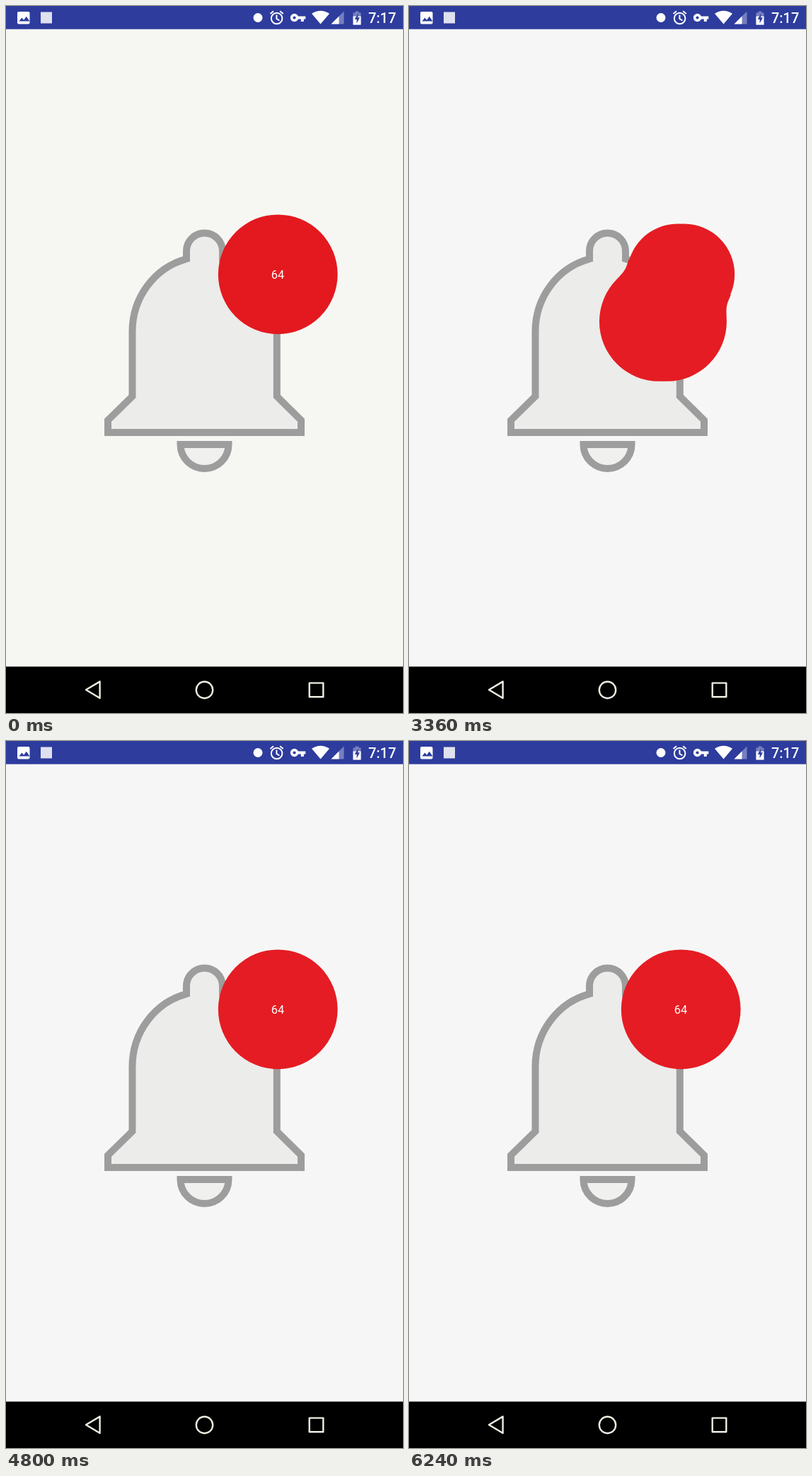
Animation of 561x998 px, one loop 6.28 s. Source, as an HTML page:

```html
<!DOCTYPE html>
<html lang="en">
<head>
<meta charset="utf-8">
<title>Notification badge</title>
<style>
  html, body { margin: 0; width: 100%; height: 100%; overflow: hidden; background: #000; }
  svg { display: block; width: 100%; height: 100%; }
  text { font-family: Roboto, sans-serif; fill: #fff; }
</style>
</head>
<body>
<svg viewBox="0 0 561 998">
  <rect id="page" width="561" height="934" fill="#f6f7f3"/>

  <g id="status">
    <rect width="561" height="32.7" fill="#2d3c9d"/>
    <rect x="16" y="8" width="17.5" height="17.5" rx="2" fill="#fff"/>
    <path d="M18.5 21.5l3.8-5 2.8 3.3 3.7-5 4.6 6.7z" fill="#2d3c9d"/>
    <rect x="49" y="8.5" width="16" height="16" fill="#dfe1ee"/>
    <circle cx="356" cy="16.5" r="6.5" fill="#fff"/>
    <g fill="none" stroke="#fff" stroke-width="2">
      <circle cx="382.6" cy="17.5" r="7.8"/>
      <path d="M382.4 12.5v5.5l4 2.5M373.5 11l4.5-3.8M391.7 11l-4.5-3.8"/>
      <circle cx="407.5" cy="16.5" r="3.9" stroke-width="3.6"/>
      <path d="M412 16.5h11.3M418.8 16.5v5.5" stroke-width="4"/>
    </g>
    <path d="M444.5 25.5L432 10.8Q444.5 2.5 457 10.8z" fill="#fff"/>
    <path d="M477.5 7.5v18h-18z" fill="#fff" opacity=".35"/>
    <path d="M470.5 14.5v11h-11z" fill="#fff"/>
    <path d="M490.5 9.5h3v-2h5v2h3v17h-11z" fill="#fff" opacity=".35"/>
    <path d="M490.5 14.5h11v12h-11z" fill="#fff"/>
    <path d="M497.6 10.5l-5 8.2h3v5.8l4.4-8.2h-2.8z" fill="#2d3c9d"/>
    <text x="531.6" y="24" font-size="20" font-weight="500" text-anchor="middle">7:17</text>
  </g>

  <g id="bell" fill="#ececeb" stroke="#9d9d9d" stroke-width="10">
    <path d="M144 602V584.8L178.5 551V460A102.3 106 0 0 1 255 357V346A25.5 25.5 0 0 1 306 346V357A102.3 106 0 0 1 382.8 460V551L417 584.8V602z"/>
    <path d="M246.5 619H314.5A34 34 0 0 1 246.5 619z" fill="#f0f0ef"/>
  </g>

  <g id="badge">
    <path id="blob"/>
    <text id="count" x="384" y="385.4" font-size="16.4" text-anchor="middle">64</text>
  </g>

  <g id="nav">
    <rect y="932.5" width="561" height="66" fill="#000"/>
    <g fill="none" stroke="#efeee2" stroke-width="2.4" stroke-linejoin="round">
      <path d="M113 965.3L132.6 953.6V977z"/>
      <circle cx="280.5" cy="965.5" r="11.7"/>
      <rect x="428.7" y="955.6" width="19.6" height="19.6"/>
    </g>
  </g>
</svg>
<script>
const LOOP = 6280, STEP = 40;
const HOME = { x: 384.2, y: 378.8 }, R = 84.4;
const PAD = 5.6;        // extra half width while dragged
const SHRINK = 0.185;   // anchor radius lost per pixel of pull
const SPREAD = 0.5, HANDLE = 0.75;
const $ = id => document.getElementById(id);

// Each drag: offset keys [ms, dx, dy], then release and spring home.
const drags = [
  { keys: [[3090, 0, 0], [3760, -71, 187], [3980, -78, 196]], end: 4200 },
  { keys: [[4810, 0, 0], [5240, -33, 163.5], [5680, -52, 188], [6020, -52, 188]], end: 6240 }
];

const smooth = p => p * p * (3 - 2 * p);
const overshoot = (p, k = 1.5) => 1 + (p - 1) ** 2 * ((k + 1) * (p - 1) + k);

function offset(t) {
  const drag = drags.find(d => t > d.keys[0][0] && t < d.end);
  if (!drag) return null;
  const { keys, end } = drag;
  const i = keys.findIndex(k => t < k[0]);
  if (i < 0) {
    const [t0, x, y] = keys[keys.length - 1];
    const left = 1 - overshoot((t - t0) / (end - t0));
    return { x: x * left, y: y * left };
  }
  const [t0, x0, y0] = keys[i - 1], [t1, x1, y1] = keys[i];
  const p = smooth((t - t0) / (t1 - t0));
  return { x: x0 + (x1 - x0) * p, y: y0 + (y1 - y0) * p };
}

const fix = (...n) => n.map(v => v.toFixed(2)).join(" ");

function pill(x, y, r, pad) {
  return `M${fix(x - pad, y - r)}h${fix(2 * pad)}a${fix(r, r)} 0 0 1 ${fix(0, 2 * r)}` +
    `h${fix(-2 * pad)}a${fix(r, r)} 0 0 1 ${fix(0, -2 * r)}z`;
}

function rim(c, r, angle) {
  const cos = Math.cos(angle);
  return { x: c.x + r * cos + PAD * Math.sign(cos), y: c.y + r * Math.sin(angle) };
}

const move = (p, angle, len) => ({ x: p.x + Math.cos(angle) * len, y: p.y + Math.sin(angle) * len });
const xy = p => fix(p.x, p.y);
const acos = v => Math.acos(Math.max(-1, Math.min(1, v)));

// Elastic bridge between two circles.
function bridge(a, ra, b, rb) {
  const dx = b.x - a.x, dy = b.y - a.y, d = Math.hypot(dx, dy), sum = ra + rb;
  if (d < 1) return "";
  const axis = Math.atan2(dy, dx), tangent = acos((ra - rb) / d);
  let ua = 0, ub = 0;
  if (d < sum) {
    ua = acos((ra * ra + d * d - rb * rb) / (2 * ra * d));
    ub = acos((rb * rb + d * d - ra * ra) / (2 * rb * d));
  }
  const angA = ua + (tangent - ua) * SPREAD;
  const angB = Math.PI - ub - (Math.PI - ub - tangent) * SPREAD;
  const tension = 0.6 + 0.83 * d / sum;
  const [left, right] = [1, -1].map(s => {
    const p = rim(a, ra, axis + s * angA), q = rim(b, rb, axis + s * angB);
    const k = Math.min(HANDLE, tension * Math.hypot(p.x - q.x, p.y - q.y) / sum);
    return {
      p, q,
      hp: move(p, axis + s * (angA - Math.PI / 2), ra * k),
      hq: move(q, axis + s * (angB + Math.PI / 2), rb * k)
    };
  });
  // Wound like the pills, so that overlaps stay filled.
  return `M${xy(right.p)}C${xy(right.hp)} ${xy(right.hq)} ${xy(right.q)}` +
    `L${xy(left.q)}C${xy(left.hq)} ${xy(left.hp)} ${xy(left.p)}z`;
}

function draw(now) {
  const t = Math.floor((now % LOOP) / STEP) * STEP;
  const pull = offset(t), late = t > 3080;
  let d = pill(HOME.x, HOME.y, R, 0);
  if (pull) {
    const ball = { x: HOME.x + pull.x, y: HOME.y + pull.y };
    const r = R - SHRINK * Math.hypot(pull.x, pull.y);
    d = pill(HOME.x, HOME.y, r, PAD) + bridge(HOME, r, ball, R) + pill(ball.x, ball.y, R, PAD);
  }
  $("blob").setAttribute("d", d);
  $("count").style.display = pull ? "none" : "";
  $("badge").setAttribute("fill", late ? "#e51c23" : "#e4191f");
  $("page").setAttribute("fill", late ? "#f6f6f6" : "#f6f7f3");
}

const start = performance.now();
function tick() {
  draw(performance.now() - start);
  requestAnimationFrame(tick);
}
tick();
</script>
</body>
</html>
```
